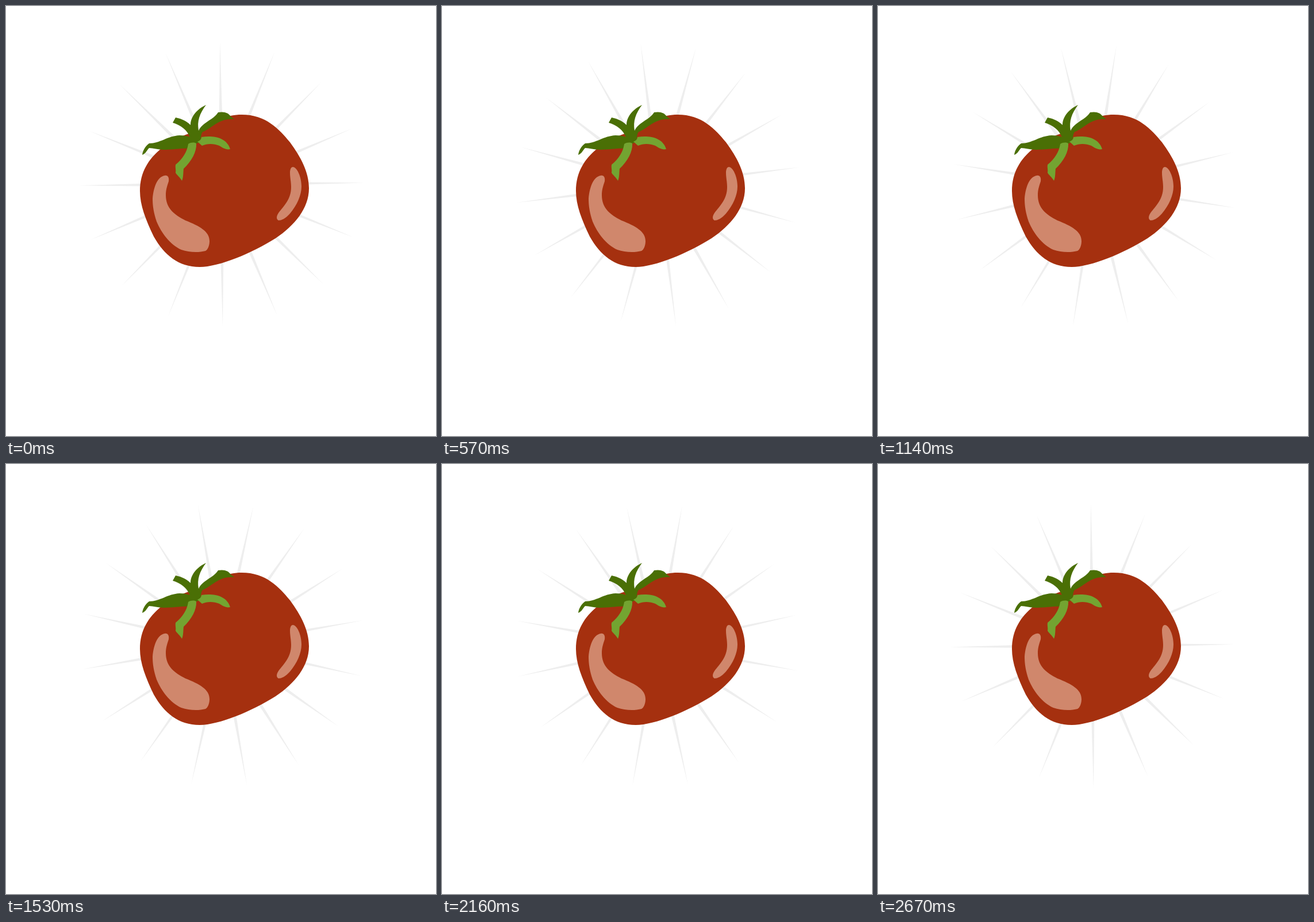
An HTML page with a canvas for the animation above (2700 ms loop, 748 by 748 pixels).

```html
<!DOCTYPE html>
<html lang="en">
<head>
<meta charset="utf-8">
<title>Shining tomato</title>
<style>
  html, body { margin: 0; width: 100%; height: 100%; overflow: hidden; background: #fff; }
  canvas { display: block; }
</style>
</head>
<body>
<canvas id="stage" width="748" height="748"></canvas>
<script>
const ctx = document.getElementById('stage').getContext('2d');

const STEP = 30, STEPS = 90;
const RAYS = { count: 16, length: 248, halfBase: 5.2, color: '#eeeeee' };
const PIVOT = { x: 373.6, y: 313 };
const OFFSET = { x: 1, y: -3.1 };   // burst centre sits slightly off the pivot
const TILT = -0.55 * Math.PI / 180;

const shape = (color, d) => ({ color, path: new Path2D(d) });

const RED = '#a5300f', SHINE = '#d0876c', DARK = '#4a6f05', LIGHT = '#73a431';

const tomato = [
  shape(RED, `M410 189 C452 189 475 214 494 237 C513 263 527 289 527 317
    C527 352 502 382 469 404 C428 430 370 454 337 454
    C300 454 275 433 257 401 C243 372 233 346 233 322
    C233 289 248 266 270 248 C288 235 303 227 318 222
    C331 220 341 217 350 211 C366 199 384 189 410 189Z`),
  shape(SHINE, `M276 295 C282 294 284 299 283 305 C280 314 278 320 278 329
    C278 352 293 363 312 373 C337 383 354 392 354 409
    C354 417 351 424 347 426 C336 429 319 429 305 424
    C285 415 270 394 262 375 C257 360 255 348 255 335
    C257 313 264 297 276 295Z`),
  shape(SHINE, `M499 280 C506 280 514 297 514 314 C514 329 506 347 494 361
    C486 370 479 373 474 373 C470 371 470 366 474 360
    C484 347 496 336 496 315 C496 305 494 299 494 290 C494 284 496 280 499 280Z`),
  shape(DARK, `M237 259 C238 251 243 243 249 239 C268 239 281 226 302 225
    C309 225 315 226 320 228 C315 216 304 207 290 203 L295 194
    C306 196 315 201 321 207 C321 192 333 179 348 172
    C337 187 332 200 335 217 C342 202 361 198 369 185
    C380 183 387 186 391 192 L397 197 C371 194 358 213 342 219
    C338 224 340 231 338 236 L330 240 L318 248
    C305 247 294 250 275 250 C264 250 256 247 249 247
    C245 251 243 257 237 259Z`),
  shape(LIGHT, `M333 236 C338 234 340 231 340 228 C352 226 366 227 374 231
    C383 235 388 242 390 249 C383 251 376 246 371 243
    C361 239 350 239 341 243Z`),
  shape(LIGHT, `M317 240 C322 237 327 237 331 239 C332 253 323 270 309 283
    C308 290 309 297 306 304 C302 297 297 294 295 290
    C296 285 294 281 295 276 C307 266 315 254 317 240Z`)
];

function drawRays(turn) {
  ctx.save();
  ctx.translate(PIVOT.x, PIVOT.y);
  ctx.rotate(turn);
  ctx.translate(OFFSET.x, OFFSET.y);
  ctx.rotate(TILT);
  ctx.fillStyle = RAYS.color;
  for (let i = 0; i < RAYS.count; i++) {
    ctx.beginPath();
    ctx.moveTo(-RAYS.halfBase, 0);
    ctx.lineTo(0, -RAYS.length);
    ctx.lineTo(RAYS.halfBase, 0);
    ctx.fill();
    ctx.rotate(2 * Math.PI / RAYS.count);
  }
  ctx.restore();
}

function draw(time) {
  const step = Math.floor(time / STEP) % STEPS;
  ctx.fillStyle = '#fff';
  ctx.fillRect(0, 0, 748, 748);
  drawRays(Math.PI * step / (STEPS - 1));   // half a turn per loop
  for (const { color, path } of tomato) {
    ctx.fillStyle = color;
    ctx.fill(path);
  }
}

const start = performance.now();
function tick() {
  draw(performance.now() - start);
  requestAnimationFrame(tick);
}
tick();
</script>
</body>
</html>
```
